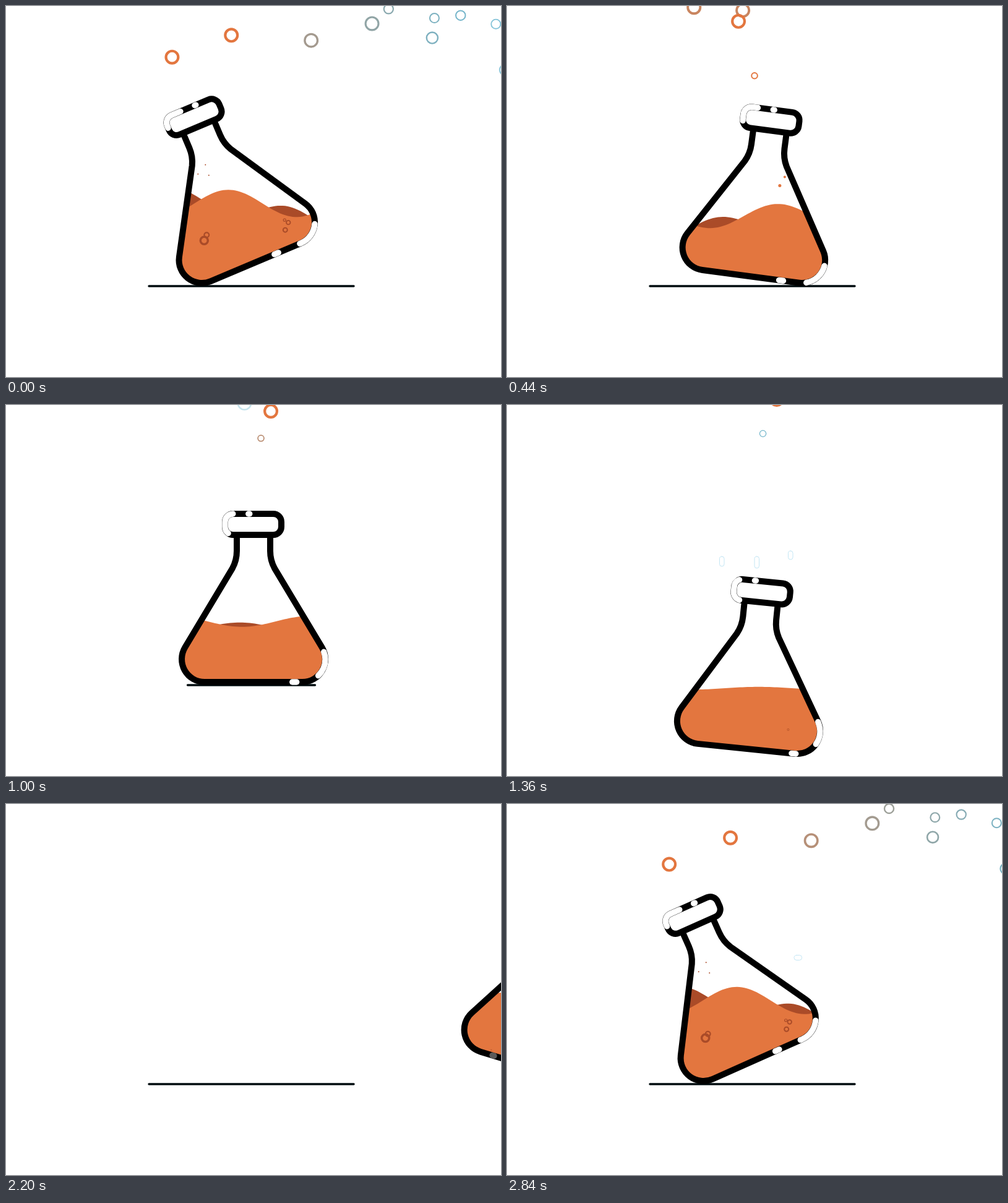
Recreate the animation shown at these times as an HTML page with a canvas. Size 800 by 600 pixels, loop 2.88 s.

```html
<!DOCTYPE html>
<html lang="en">
<head>
<meta charset="utf-8">
<title>Bubbling flask</title>
<style>
html, body { margin: 0; width: 100%; height: 100%; overflow: hidden; background: #fff; }
canvas { display: block; }
</style>
</head>
<body>
<canvas id="stage" width="800" height="600"></canvas>
<script>
const ctx = document.getElementById('stage').getContext('2d');
const LOOP = 2880, ENTER = 2200, FALL = 4040, GONE = 4560;
const ORANGE = '#e3763f', DARK = '#aa4b28', TURN = 2 * Math.PI;

const clamp = v => Math.max(0, Math.min(1, v));
const mix = (a, b, k) => a + (b - a) * k;
const ramp = (t, a, b) => clamp((t - a) / (b - a));
const smooth = (t, a, b) => { const k = ramp(t, a, b); return k * k * (3 - 2 * k); };
const hump = (t, a, b) => Math.sin(Math.PI * ramp(t, a, b));

// The clock runs from ENTER to ENTER + LOOP, so one entry-to-fall story is continuous.

// Bubbles left behind on the way in: radius and place as the flask brakes.
// The further right, the older, and the less they still have to rise.
const trail = [
  [12, 459, 137], [9.7, 529, 57], [12, 564, 94], [8.7, 600, 65], [10.3, 671, 101],
  [8.5, 678, 68], [5.8, 695, 33], [8.7, 722, 57], [8.5, 782, 62], [9.7, 796, 134], [8, 806, 12]
].map(([r, x, y]) => ({
  r, x, y, at: 2520, born: 2440 - .4 * (x - 459), rise: .18 * (1000 - x), tau: 200, hold: 300, fade: 260
}));
// Slower single bubbles: time, radius, place, rise
const singles = [
  [2840, 12, 361, 55, 60], [2840, 12, 262, 98, 120], [3320, 12, 374, 25, 50],
  [3320, 5.8, 400, 113, 70], [3880, 12, 428, 10, 27]
].map(([at, r, x, y, rise]) => ({
  r, x, y, at, born: at - 80, rise, tau: 300, hold: 430, fade: 600
}));
const bubbles = [...trail, ...singles];

// Outlines, with the origin midway between the flask's bottom corners
const body = new Path2D('M-27-201V-175Q-27-160-34-147L-110.7-19A37 37 0 0 0-79 37H79A37 37 0 0 0 110.7-19L34-147Q27-160 27-175V-201');
const cap = new Path2D();
cap.roundRect(-46, -235, 91, 34, 13);
const bodyEdge = new Path2D('M-70 37H79A37 37 0 0 0 116 0Q116-8 111-18');
const capEdge = new Path2D('M-33-201A13 13 0 0 1-46-214V-222A13 13 0 0 1-33-235H32A13 13 0 0 1 45-222V-214');

function tilt(t) {
  const lean = 1 - Math.pow(1 - ramp(t, ENTER, 2820), 2.52);
  return 17 - 41.2 * lean + 31.7 * smooth(t, 2820, 3320) - 7.5 * smooth(t, 3320, 3680);
}

// Slides in like a damped spring, rocking on whichever corner is lower, then drops.
function flaskPose(t) {
  const rad = Math.PI / 180;
  if (t > FALL) {
    const s = (t - FALL) / 1000, k = Math.min(1.4, s / .2);
    return { x: 400 - 9.5 * k, y: 411 + 2675 * s * s, a: 5.8 * k * rad };
  }
  const u = t - ENTER, a = tilt(t) * rad;
  const x = 400 + 452 * Math.exp(-u / 203) * Math.cos(Math.PI * u / 1150);
  const slip = 79 * (1 - Math.cos(a));
  return { x: a < 0 ? x - slip : x + slip, y: 411 - 79 * Math.abs(Math.sin(a)), a };
}

function disc(x, y, r, color) {
  if (r <= 0) return;
  ctx.fillStyle = color;
  ctx.beginPath();
  ctx.arc(x, y, r, 0, TURN);
  ctx.fill();
}

function ring(x, y, r, width, color) {
  if (r <= .3) return;
  ctx.strokeStyle = color;
  ctx.lineWidth = width;
  ctx.beginPath();
  ctx.arc(x, y, r - width / 2, 0, TURN);
  ctx.stroke();
}

function streak(x, y, w, h) {
  if (w <= 0) return;
  ctx.beginPath();
  ctx.roundRect(x, y, w, h, Math.min(w, h) / 2);
  ctx.fillStyle = '#fff';
  ctx.fill();
  ctx.strokeStyle = '#b5e0f2';
  ctx.lineWidth = .8;
  ctx.stroke();
}

function drawGround(t) {
  const k = t < 4300
    ? 1 - Math.pow(ramp(t, 3780, 4000), 1.25)
    : 1 - Math.pow(1 - ramp(t, 4580, 4840), 2);
  if (k <= 0) return;
  ctx.strokeStyle = '#000c0f';
  ctx.lineWidth = 3.4;
  ctx.beginPath();
  ctx.moveTo(396.5 - 165.5 * k, 453);
  ctx.lineTo(396.5 + 165.5 * k, 453);
  ctx.stroke();
}

function drawStreaks(t) {
  const slide = (left, right, y, end, stop) => {
    const k = ramp(t, 2520, stop);
    const x = mix(mix(right, left, ramp(t, 2420, 2520)), end, k);
    if (k < 1) streak(x, y, mix(right, end + 10, k) - x, 8);
  };
  slide(605, 711, 244.5, 460, 2850);
  slide(573, 664, 273.5, 480, 2760);

  if (t > 4190 && t < 4580) {
    const y = (t - 4240) * .93;
    [[343.5, 244, 16], [400, 244, 19], [454.5, 235, 14]].forEach(([x, top, h]) => streak(x, top + y, 7.5, h));
  }
}

function drawBubble(b, t) {
  const age = t - b.born, gone = (age - b.hold) / b.fade;
  if (age <= 0 || gone > 1.25) return;
  const k = 1 - Math.exp((b.at - t) / b.tau);
  const f = clamp(gone), r = b.r * clamp(age / 60);
  const color = `rgba(${mix(227, 110, f)},${mix(118, 185, f)},${mix(63, 210, f)},${clamp((1.25 - gone) * 4)})`;
  ring(b.x + .035 * b.r * b.rise * k, b.y - b.rise * k, r, r * mix(.35, .22, f), color);
}

function fillBelow(p, level, color) {
  ctx.beginPath();
  for (let x = -130; x <= 130; x += 4) ctx.lineTo(p.x + x, p.y + level(x));
  ctx.lineTo(p.x + 130, p.y + 130);
  ctx.lineTo(p.x - 130, p.y + 130);
  ctx.fillStyle = color;
  ctx.fill();
}

// Two waves in opposite phase run left and calm down; the rear one also sways.
function drawWaves(t, p) {
  const calm = 1 - smooth(t, 3000, 4550), amp = 22 * calm;
  const peak = 60 - .29 * (t - 2520) + 15 * Math.sin(TURN * (t - 2690) / 700);
  const phase = TURN * peak / 220;
  const sway = .16 * calm * Math.cos(TURN * (t - 2880) / 1150);
  fillBelow(p, x => -53 + sway * x + .63 * amp * Math.cos(TURN * x / 175 - phase), DARK);
  fillBelow(p, x => -61 - amp * Math.cos(TURN * x / 220 - phase), ORANGE);
}

function drawLiquid(t, p) {
  drawWaves(t, p);

  const pop = hump(t, 2440, 2600);
  disc(p.x - 80, p.y - 51, 7 * pop, ORANGE);
  disc(p.x - 66, p.y - 37, 6 * pop, ORANGE);

  // Rings under the surface; small ones climb faster
  const size = ramp(t, ENTER - 50, 2560) * (1 - ramp(t, 2880, 3160));
  [[-69, -1, 7.8], [-65, -10, 5], [67, -30, 4.2], [61, -34, 2.7], [62, -18, 4.5]].forEach(([x, y, r]) => {
    const climb = (8.5 - r) * 8 * (2880 - t) / 360;
    ring(p.x + x, p.y + y + climb, r * size, r * size * .45, DARK);
  });
  const late = 5 * ramp(t, 4200, 4300);
  ring(p.x + 64, p.y + 6 - (t - 4240) / 12, late, late * .5, '#bd5a2e');

  // Fine spray above the surface
  const spray = ramp(t, 2640, 2740) * (1 - ramp(t, 2880, 2960)), rise = (t - 2880) / 40;
  [[-67, -123.5], [-79, -108.5], [-61.5, -106.5]].forEach(([x, y]) =>
    disc(p.x + x + rise, p.y + y - rise, spray, DARK));
  const drop = hump(t, 3210, 3430), lift = (t - 3320) / 10;
  disc(p.x + 42, p.y - 110 - lift, 2.5 * drop, ORANGE);
  disc(p.x + 50, p.y - 124 - lift, 2 * drop, ORANGE);
}

function glint(path, from, length) {
  ctx.setLineDash([length, 999]);
  ctx.lineDashOffset = -from;
  ctx.stroke(path);
  ctx.setLineDash([]);
}

// Reflections sweep round the edges on arrival, then creep on.
function drawGlints(t) {
  const k = smooth(t, 2500, 2840), creep = Math.max(0, t - 2840);
  const dot = mix(12.5, 105, k) + .03 * creep;
  const capDot = mix(142, 91, k) - .016 * creep;
  const w = mix(1.5, 3.5, k);
  ctx.lineCap = 'round';
  ctx.strokeStyle = '#fff';
  ctx.lineWidth = 9.4;
  ctx.globalAlpha = ramp(t, 2095, 2395);
  glint(bodyEdge, dot - w, 2 * w);
  glint(bodyEdge, dot + mix(111, 41, k), mix(37, 42, k));
  glint(capEdge, capDot - mix(52, 66, k), mix(20, 40, k));
  if (k > .2) glint(capEdge, capDot - 1, 2);
}

function drawFlask(t) {
  if (t >= GONE) return;
  const p = flaskPose(t);
  ctx.save();
  ctx.translate(p.x, p.y);
  ctx.rotate(p.a);
  ctx.fillStyle = '#fff';
  ctx.fill(body);

  // The liquid stays level while the glass turns
  ctx.save();
  ctx.clip(body);
  ctx.rotate(-p.a);
  drawLiquid(t, { x: 0, y: 0 });
  ctx.restore();

  ctx.strokeStyle = '#000';
  ctx.lineWidth = 10;
  ctx.lineCap = 'butt';
  ctx.stroke(body);
  ctx.fillStyle = '#fff';
  ctx.fill(cap);
  ctx.stroke(cap);
  drawGlints(t);
  ctx.restore();
}

function draw(now) {
  const time = now % LOOP, t = time < ENTER ? time + LOOP : time;
  ctx.fillStyle = '#fff';
  ctx.fillRect(0, 0, 800, 600);
  ctx.lineCap = 'round';
  drawGround(t);
  drawStreaks(t);
  bubbles.forEach(b => drawBubble(b, t));
  drawFlask(t);
}

const start = performance.now();
function tick() {
  draw(performance.now() - start);
  requestAnimationFrame(tick);
}
tick();
</script>
</body>
</html>
```
